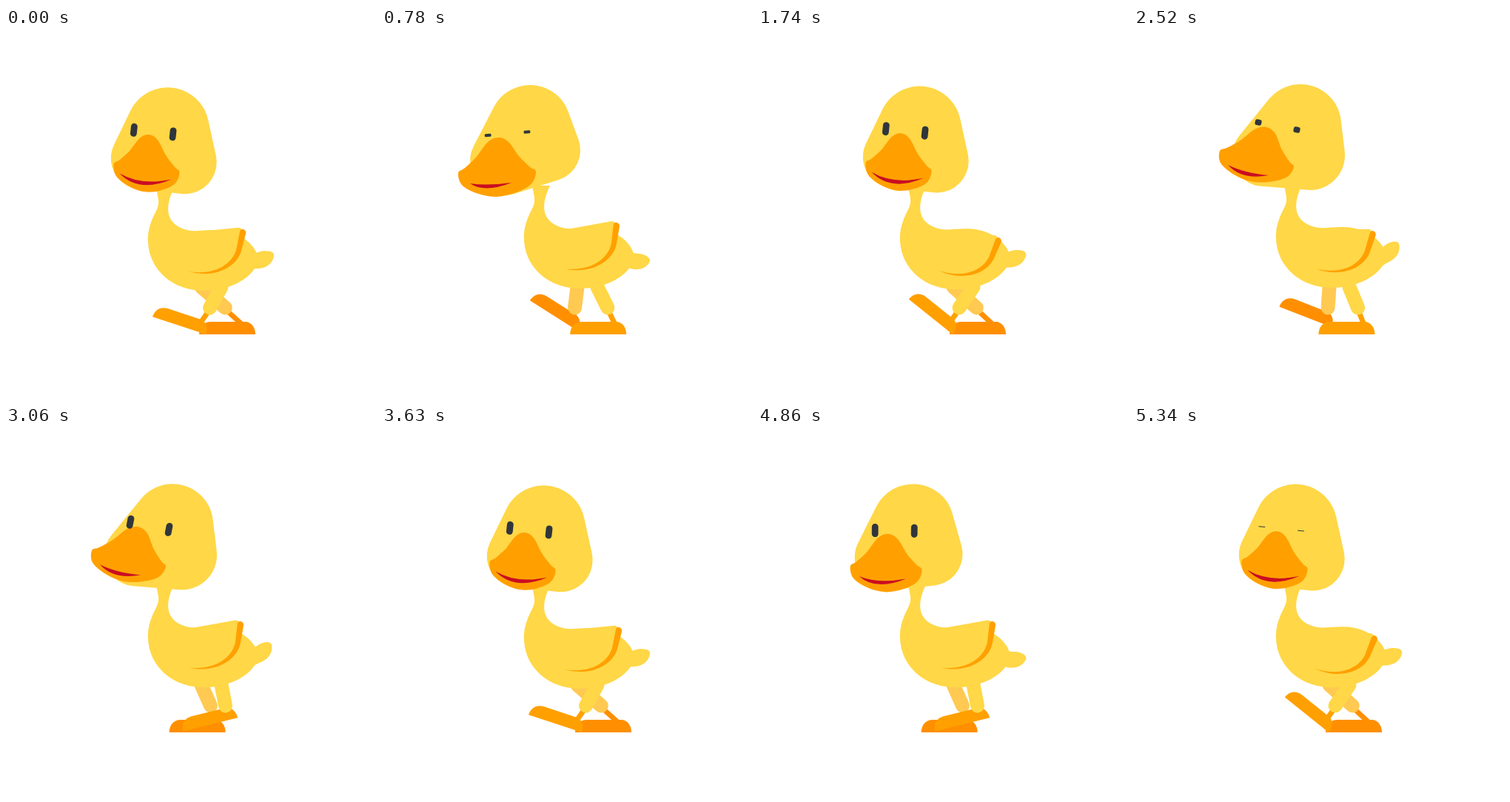
Recreate the animation shown at these times as an HTML page with a canvas. Size 500 by 500 pixels, loop 5370 ms.

```html
<!DOCTYPE html>
<html lang="en">
<head>
<meta charset="utf-8">
<title>Walking duckling</title>
<style>
html, body { margin: 0; width: 100%; height: 100%; overflow: hidden; background: #fff; }
canvas { display: block; width: 100vmin; height: 100vmin; }
</style>
</head>
<body>
<canvas id="stage" width="500" height="500"></canvas>
<script>
const ctx = document.getElementById('stage').getContext('2d');
const STEP = 30, COUNT = 179, RAD = Math.PI / 180;
const YELLOW = '#ffd747', SHADE = '#ffc952', ORANGE = '#ffa000', DEEP = '#ff8f00';
const BLINKS = [27.1, 86.2, 178.2];

// Head circles (x, y, r), beak top/left/right, mouth ends, eyes (x, y, tilt)
const pose = (head, beak, mouth, eyes, sag) => ({ head, beak, mouth, eyes, sag });
const AHEAD = pose(
  [[218.5, 134.3, 56], [241.7, 179.3, 43], [183.7, 174, 42]],
  [[193.5, 142], [145.5, 182], [234.5, 193]],
  [[153.5, 194.5], [223.5, 202.5]], [[199.2, 138.6, 6]], 13);
const DOWN = pose(
  [[200, 133, 55], [226, 166, 42], [165, 181, 46]],
  [[157, 149], [103, 197], [208, 195]],
  [[119, 211], [175, 210]], [[169.5, 143.7, -5]], 4);
const UP = pose(
  [[225, 133, 55], [238, 174, 47], [175, 174, 42]],
  [[179, 136], [116, 168], [216, 190]],
  [[127, 187], [182, 201]], [[194, 134.5, 11]], 4);

// One side of the beak in its own skewed axes; the other side swaps them
const SIDE = [[-.07, .2], [0, .56], [.01, .85], [0, 1], [.23, 1.12], [.56, 1.04]];
const BEAK = [[0, 0], ...SIDE, [.85, .85], ...SIDE.map(([u, v]) => [v, u]).reverse()];

const lerp = (a, b, k) => a + (b - a) * k;
const mix = (a, b, k) => Array.isArray(a) ? a.map((v, i) => mix(v, b[i], k)) : lerp(a, b, k);
const smooth = x => { x = Math.max(0, Math.min(1, x)); return x * x * (3 - 2 * x); };
const wrap = x => (x % 60 + 60) % 60;

function fillPath(d, color) {
  ctx.fillStyle = color;
  ctx.fill(new Path2D(d));
}

// Closed smooth curve through the points
function blob(p, color) {
  const n = p.length, at = i => p[(i + n) % n];
  ctx.beginPath();
  ctx.moveTo(...p[0]);
  for (let i = 0; i < n; i++) {
    const a = at(i - 1), b = at(i), c = at(i + 1), d = at(i + 2);
    ctx.bezierCurveTo(
      b[0] + (c[0] - a[0]) / 6, b[1] + (c[1] - a[1]) / 6,
      c[0] - (d[0] - b[0]) / 6, c[1] - (d[1] - b[1]) / 6, ...c);
  }
  ctx.fillStyle = color;
  ctx.fill();
}

// Outline wrapped tightly around circles listed clockwise
function hull(circles, color) {
  const n = circles.length;
  const normals = circles.map(([x, y, r], i) => {
    const [x2, y2, r2] = circles[(i + 1) % n];
    return Math.atan2(y2 - y, x2 - x) - Math.acos((r - r2) / Math.hypot(x2 - x, y2 - y));
  });
  ctx.beginPath();
  circles.forEach(([x, y, r], i) => ctx.arc(x, y, r, normals[(i + n - 1) % n], normals[i]));
  ctx.fillStyle = color;
  ctx.fill();
}

function line(x1, y1, x2, y2, width, color) {
  ctx.beginPath();
  ctx.moveTo(x1, y1);
  ctx.lineTo(x2, y2);
  ctx.lineWidth = width;
  ctx.lineCap = 'round';
  ctx.strokeStyle = color;
  ctx.stroke();
}

function turned(x, y, deg, draw) {
  ctx.save();
  ctx.translate(x, y);
  ctx.rotate(deg * RAD);
  draw();
  ctx.restore();
}

// Heel slides back on the ground, then swings forward; the toe lifts before landing
function heelAt(phase) {
  const p = wrap(phase - 58), swing = Math.max(0, (p - 34) / 26);
  const u = Math.min(1, wrap(phase - 31) / 31);
  return {
    x: swing ? lerp(263, 337, (1 + Math.cos(Math.PI * swing)) / 2) : Math.min(337, 263 + 2.4 * p),
    y: 414 - 21 * Math.sin(Math.PI * swing),
    deg: 40 * Math.sin(Math.PI * u ** 5) - 25 * Math.sin(Math.PI * u) * (1 - u)
  };
}

function leg(phase, hip, shift, skin, color) {
  const { x, y, deg } = heelAt(phase);
  const c = Math.cos(deg * RAD), s = Math.sin(deg * RAD);
  const knee = 272 + .49 * (x - 263) + shift;
  line(knee, 380, x - 13 * c + 9 * s, y - 13 * s - 9 * c, 7, color);
  turned(x, y, deg, () =>
    fillPath('M-76 0C-76-10-70-17-60-17L-14-17C-5-17 0-9 0 0Z', color));
  line(hip, 350, knee, 378, 19, skin);
}

function face(r) {
  const q = r % 60, first = r % 120 < 60;
  const k = first ? 1.04 * smooth(1 - Math.abs(q - 29) / 25)
                  : smooth((30 - Math.abs(q - 30)) / 18);
  const to = first ? DOWN : UP;
  const get = part => mix(AHEAD[part], to[part], k);

  hull(get('head'), YELLOW);

  const [top, left, right] = get('beak');
  blob(BEAK.map(([u, v]) => top.map((t, i) =>
    t + u * (left[i] - t) + v * (right[i] - t))), ORANGE);

  const [a, b] = get('mouth'), sag = get('sag');
  const mx = (a[0] + b[0]) / 2 - 6, my = (a[1] + b[1]) / 2 + sag;
  ctx.beginPath();
  ctx.moveTo(...a);
  ctx.quadraticCurveTo(mx, my, ...b);
  ctx.quadraticCurveTo(mx - 3, my + 10, ...a);
  ctx.fillStyle = '#c90d22';
  ctx.fill();

  const blink = Math.min(...BLINKS.map(t => Math.abs(r - t)));
  const h = Math.max(1, 18 * Math.min(1, blink / 5));
  const [[ex, ey, tilt]] = get('eyes');
  turned(ex, ey, tilt, () => {
    ctx.fillStyle = '#30363b';
    for (const x of [-26.5, 26.5]) {
      ctx.beginPath();
      ctx.roundRect(x - 4.4, -h / 2, 8.8, h, Math.min(4.2, h / 3));
      ctx.fill();
    }
  });
}

function wing(r) {
  ctx.save();
  ctx.translate(243, 310);
  ctx.rotate(-9.3 * RAD * Math.sin((r - 1) * Math.PI / 6));
  ctx.translate(-243, -310);
  fillPath('M250 274L312 268Q318 267 319 272C318 300 308 327 247 328Q236 300 250 274Z', YELLOW);
  fillPath('M316 273Q317 269 321 270Q325 272 324 276L318 299' +
    'C312 321 282 337 247 327C285 333 306 315 311 298Z', ORANGE);
  ctx.restore();
}

function draw(r) {
  ctx.clearRect(0, 0, 500, 500);
  leg(r + 30, 264, -12, SHADE, DEEP);

  const bob = 3 * Math.cos((r - 5) * Math.PI / 15);
  ctx.save();
  ctx.translate(0, bob);
  turned(330, 310, 22 * Math.sin(r * Math.PI / 60), () =>
    fillPath('M0-10C8-6 10-10 18-11C28-12 33-9 32-4C30 7 20 13 8 13L-8 16Z', YELLOW));
  fillPath('M203 214C205 228 209 234 203 245C194 262 191 275 192 288' +
    'C194 325 225 353 268 353C302 353 331 337 340 316' +
    'C345 300 322 270 280 271C262 271 250 275 236 268C217 259 214 241 227 214Z', YELLOW);
  ctx.restore();

  leg(r, 291, 0, YELLOW, ORANGE);

  ctx.save();
  ctx.translate(0, bob);
  wing(r);
  face(r);
  ctx.restore();
}

const start = performance.now();
function tick() {
  const i = Math.floor(Math.max(0, performance.now() - start) / STEP) % COUNT;
  draw(i < 9 ? i + 1 : i);
  requestAnimationFrame(tick);
}
tick();
</script>
</body>
</html>
```
